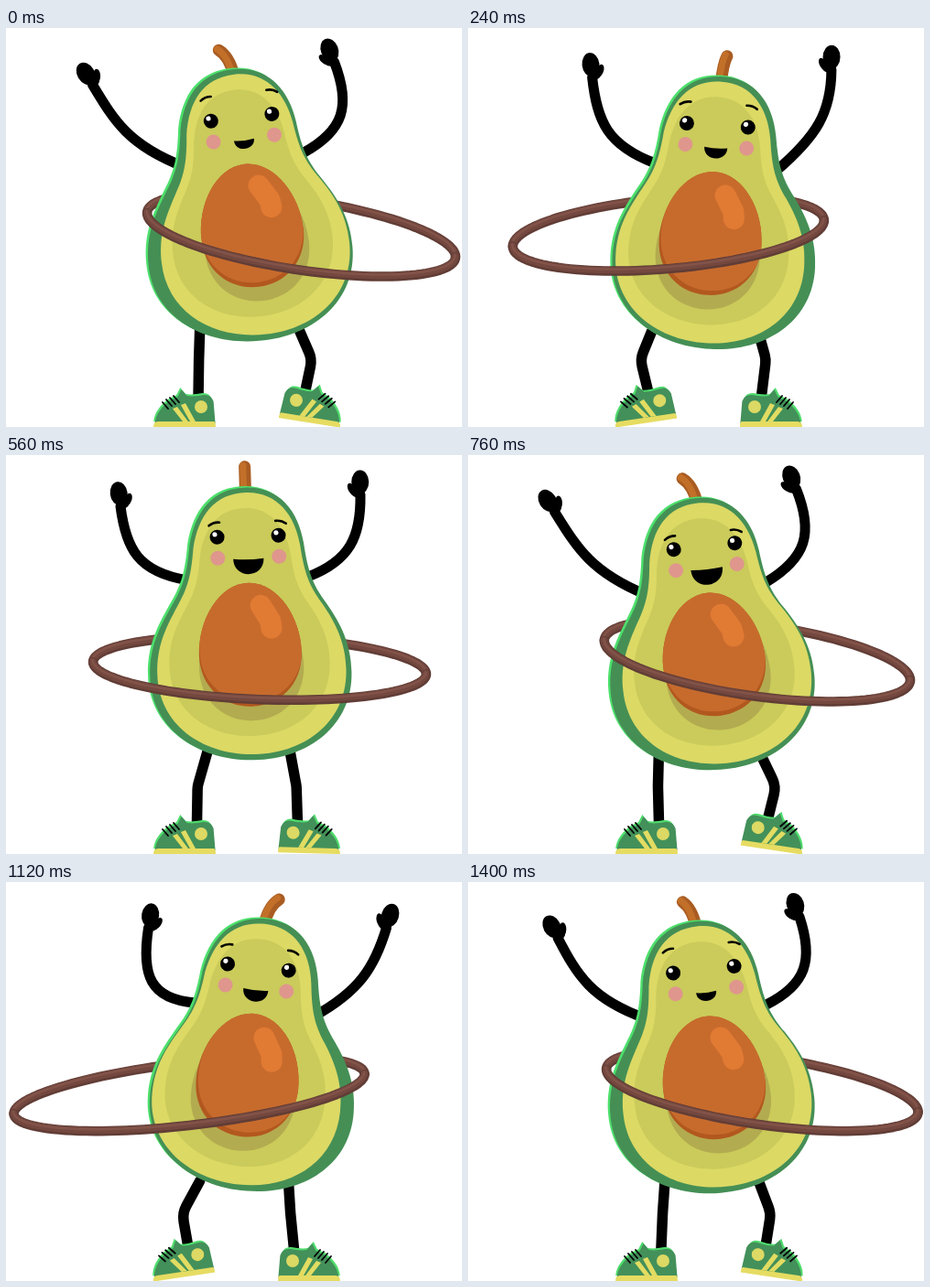
An HTML page with a canvas that plays this animation: 498x436 px, repeating every 1.44 s.

```html
<!DOCTYPE html>
<html lang="en">
<head>
<meta charset="utf-8">
<title>Hula avocado</title>
<style>
html, body { margin: 0; width: 100%; height: 100%; overflow: hidden; background: #fff; }
canvas { display: block; width: 498px; height: 436px; }
</style>
</head>
<body>
<canvas id="stage" width="498" height="436"></canvas>
<script>
const ctx = document.getElementById('stage').getContext('2d');
const LOOP = 1440, SWING = 720, STEP = 40, RAD = Math.PI / 180;

const SKIN = new Path2D('M0-172C36-172 56-145 61-110C65-78 70-64 84-44C100-20 110 2 110 32' +
  'C110 90 62 126 2 126C-58 126-109 90-109 32C-109 0-98-20-84-44C-70-66-66-82-63-110C-56-148-36-172 0-172Z');
const SEED = new Path2D('M0-67C32-67 56-28 56 10C56 46 30 68 0 68C-30 68-56 46-56 10C-56-28-32-67 0-67Z');
const SHINE = new Path2D('M13-42L23-25L24-17');
const SHOE = new Path2D('M162 431C163 421 169 414 177 407L187 402L191 394L197 401' +
  'C203 402 209 401 215 400Q223 399 226 407L228 431Z');
const SOLE = new Path2D('M161 436Q161 430 166 430L227 430Q229 430 229 436Z');
const STRIPES = new Path2D('M182 416L187 414L199 430L193 430ZM191 412L196 410L207 430L201 430Z');
const LACES = new Path2D('M171 409l6 7M175 406l6 7M179 404l6 7M183 402l6 7');

let now = 0;

// Cosine over one swing of the hips; the peak comes `peak` degrees into it.
const wave = (mean, amp, peak = 0) => mean + amp * Math.cos(now / SWING * 2 * Math.PI - peak * RAD);

// Cosine over the whole loop, used by the slower facial expression.
const slow = (mean, amp) => mean + amp * Math.cos(now / LOOP * 2 * Math.PI);

function group(draw, x = 0, y = 0, deg = 0, sx = 1, sy = 1) {
  ctx.save();
  ctx.translate(x, y);
  ctx.rotate(deg * RAD);
  ctx.scale(sx, sy);
  draw();
  ctx.restore();
}

function fill(color, path) {
  ctx.fillStyle = color;
  ctx.fill(path);
}

function stroke(color, width, path) {
  ctx.strokeStyle = color;
  ctx.lineWidth = width;
  ctx.stroke(path);
}

function oval(color, x, y, rx, ry = rx, angle = 0) {
  const p = new Path2D();
  p.ellipse(x, y, rx, ry, angle, 0, 7);
  fill(color, p);
}

function bodyPose() {
  return {
    x: wave(266.2, 1.8),
    y: wave(215, 9, 88) - 1.6 * Math.sin(now / SWING * 4 * Math.PI),
    tilt: wave(0, -6.7, -5)
  };
}

function drawArm(body, side, wrist, elbow, bend) {
  const c = Math.cos(body.tilt * RAD), s = Math.sin(body.tilt * RAD);
  const sx = body.x + side * 66 * c + 72 * s, sy = body.y + side * 66 * s - 72 * c;
  const [x, y] = wrist, [ex, ey] = elbow;
  stroke('#000', 11, new Path2D(`M${x} ${y}C${ex} ${ey} ${bend} ${sx} ${sy}`));
  group(() => {
    oval('#000', 0, -14, 9.5, 13);
    oval('#000', side * -9, -6, 4, 7.5, side * -0.5);
    oval('#000', side * -3, -3, 7, 6);
  }, x, y, Math.atan2(x - ex, ey - y) / RAD);
}

function drawArms(body) {
  drawArm(body, -1, [wave(125, -31, 10), wave(56, 6, 10)], [wave(133.5, -15), 102], [wave(146, -12), 128]);
  drawArm(body, 1, [wave(387, -29, 10), wave(43.5, -6.5, 10)], [wave(390, -13), wave(90, -5)],
    [wave(377, -8), wave(116, -4)]);
}

function drawLeg(hip, hipY, knee, ankle) {
  const p = new Path2D();
  p.moveTo(hip, hipY);
  p.arcTo(knee, 362, ankle, 402, 26);
  p.lineTo(ankle, 402);
  stroke('#000', 11.5, p);
}

function drawShoe(lift) {
  group(() => {
    ctx.translate(-165, -436);
    group(() => fill('#4fdc6c', SHOE), -0.8, -1);
    group(() => fill('#43905a', SHOE), 0.6, 1);
    fill('#e2dc62', STRIPES);
    oval('#dcd964', 213, 414, 7);
    stroke('#000', 1.8, LACES);
    fill('#e6dc62', SOLE);
  }, 165, 436, -lift);
}

function drawLegs() {
  drawLeg(wave(210, 10, 280), wave(328, 4, 90), wave(200, 13, -35), wave(204, 7, -30));
  drawLeg(wave(315.5, 8, 50), wave(331, 6, 90), wave(323.5, 13.5, 38), wave(320.5, 6, 30));
  drawShoe(Math.max(0, wave(0, 11, 160)));
  group(() => drawShoe(Math.max(0, wave(0, 9))), 526, 0, 0, -1);
}

function drawHoop(from) {
  const x = wave(258, 65, -7), y = wave(228, 5.5, 250);
  const wide = wave(176.5, 13.5, 225) + 3 * Math.cos(now / SWING * 4 * Math.PI - Math.PI / 3);
  const slope = wave(0, 24, -6), deep = wave(37, 3.3, 60);
  const p = new Path2D();
  for (let q = 0; q <= 180; q += 3) {
    const c = Math.cos((from + q) * RAD), s = Math.sin((from + q) * RAD);
    p.lineTo(x + wide * c, y + slope * c + deep * s);
  }
  stroke('#613d36', 10.5, p);
  group(() => stroke('#74483f', 7, p), -0.3, -0.9);
  group(() => stroke('#825349', 2.5, p), -0.5, -2);
}

function drawStalk() {
  const tip = wave(0, -13.5, 10);
  const p = new Path2D(`M${tip} -194Q${tip * 0.2} -186 0 -165`);
  stroke('#a95c22', 13, p);
  group(() => stroke('#c27029', 7, p), -1.8, -1.5);
}

function drawFace() {
  const w = slow(14.2, -3.2), h = slow(14, -4), brow = slow(19.5, 6);
  for (const s of [-1, 1]) {
    const x = s * 33.5 - 1.5;
    oval('#df968d', x, -95, 8);
    oval('#000', x, -118, 8);
    oval('#fff', x - 2.5, -121, 2.6);
    group(() => stroke('#000', 2.6, new Path2D('M-6 0.6Q0-1.8 6 0.6')), x + s * 3, -118 - brow, s * 16);
  }
  group(() => fill('#000', new Path2D(
    `M${-w} 0Q0 2 ${w} 0C${w} ${h * 1.32} ${-w} ${h * 1.32} ${-w} 0Z`)), -1.5, -93.5);
}

function drawSeed(shift) {
  group(() => fill('#b3ab50', SEED), -shift * 0.6, 15, 0, 1.02, 1.01);
  group(() => {
    fill('#b2581f', SEED);
    ctx.clip(SEED);
    group(() => fill('#c76b2d', SEED), 1 + shift * 0.2, -5);
    stroke('#e17a33', 23, SHINE);
  });
}

function drawBody({ x, y, tilt }) {
  const shift = tilt * 0.8, wide = 1 + Math.abs(shift) * 0.004;
  group(() => {
    drawStalk();
    // The peel lags behind the front, which makes one side look thicker.
    group(() => {
      group(() => fill('#4de06c', SKIN), -1.2, -0.8);
      group(() => fill('#458f55', SKIN), 1, 0.6);
    }, shift, 0, -shift * 0.35, wide);
    group(() => fill('#dcd965', SKIN), 0.5, -0.6, 0, 0.942, 0.96);
    group(() => fill('#cacb5a', SKIN), -1.5, -5, 0, 0.8, 0.836);
    drawSeed(shift);
    group(drawFace, 2 - tilt * 0.35);
  }, x, y, tilt);
}

function draw() {
  const body = bodyPose();
  ctx.fillStyle = '#fff';
  ctx.fillRect(0, 0, 498, 436);
  ctx.lineCap = ctx.lineJoin = 'round';
  drawLegs();
  drawHoop(180);
  drawArms(body);
  drawBody(body);
  drawHoop(0);
}

const start = performance.now();
function tick() {
  const t = (performance.now() - start) % LOOP;
  now = Math.floor(t / STEP) * STEP;
  draw();
  requestAnimationFrame(tick);
}
tick();
</script>
</body>
</html>
```
